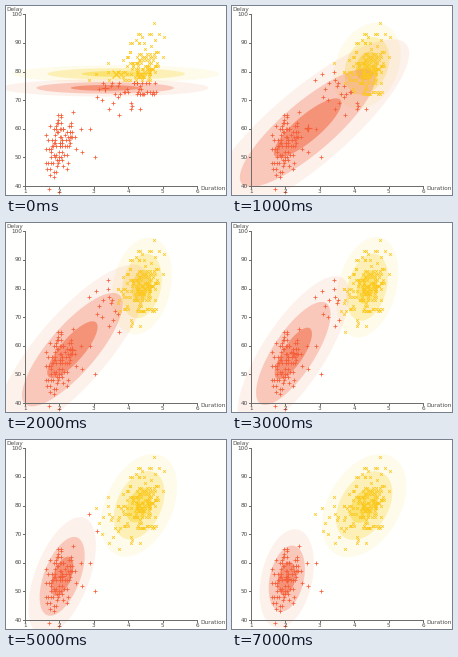
Write a matplotlib script that moves like this. It is 220x189 px and loops after 7.5 s.

```python
import numpy as np
import matplotlib.pyplot as plt
from matplotlib.animation import FuncAnimation
from matplotlib.patches import Polygon

W, H, DPI = 220, 189, 100
STEPS, INTERVAL = 15, 500
PX = 72 / DPI  # points per pixel

AXIS, TEXT = "#6e6e6e", "#4a4a4a"
FILL = ["#f05028", "#f8d21e"]
MARK = ["#f5603c", "#fcc81e"]
SHAPE = ["+", "x"]
SIZE = [3.4, 2.6]
RINGS = {3: 0.08, 2: 0.25, 1: 0.44}  # sigmas: opacity


def px(duration):
    return 19 + (duration - 1) * 34.4


def py(delay):
    return 180 - (delay - 40) * 2.86


def cloud(rng, n, mean, sd, rho, skew):
    """n points with exactly these moments; durations lean towards skew."""
    z = np.column_stack([skew * rng.gamma(5, size=n), rng.normal(size=n)])
    z -= z.mean(axis=0)
    z = np.linalg.solve(np.linalg.cholesky(np.cov(z.T)), z.T)
    cov = np.outer(sd, sd) * [[1, rho], [rho, 1]]
    pts = mean + (np.linalg.cholesky(cov) @ z).T
    pts[:, 1] = np.round(pts[:, 1])  # delays in whole minutes
    return pts


def density(pts, mean, cov):
    d = pts - mean
    dist = np.sum(d * np.linalg.solve(cov, d.T).T, axis=1)
    return np.exp(-dist / 2) / np.sqrt(np.linalg.det(cov))


def expect(pts, weights, means, covs):
    """Share of each cluster in each point."""
    p = np.array([w * density(pts, m, c)
                  for w, m, c in zip(weights, means, covs)]) + 1e-300
    return p / p.sum(axis=0)


def maximise(pts, share):
    weights = share.mean(axis=1)
    means = [np.average(pts, axis=0, weights=s) for s in share]
    covs = [np.cov(pts.T, aweights=s, bias=True) for s in share]
    return weights, means, covs


def ring(mean, cov, k):
    t = np.linspace(0, 2 * np.pi, 120)
    circle = np.array([np.cos(t), np.sin(t)])
    x, y = np.asarray(mean)[:, None] + k * np.linalg.cholesky(cov) @ circle
    return np.column_stack([px(x), py(y)])


# Two clouds, and the run of the EM algorithm that tells them apart
rng = np.random.default_rng(7)
data = np.vstack([
    cloud(rng, 97, (2.04, 54.5), (0.265, 5.8), 0.28, 1),
    cloud(rng, 175, (4.29, 80), (0.41, 6), 0.38, -1),
])
model = ([0.5, 0.5], [(3.33, 74.3), (3.65, 79.2)], [np.eye(2), np.eye(2)])
history = []
for _ in range(STEPS):
    share = expect(data, *model)
    history.append((model, share[1] > share[0]))
    model = maximise(data, share)

fig = plt.figure(figsize=(W / 100, H / 100), dpi=DPI, facecolor="#fffffd")
ax = fig.add_axes([0, 0, 1, 1])
ax.set_xlim(0, W)
ax.set_ylim(H, 0)
ax.axis("off")


def line(x, y):
    ax.plot(x, y, color=AXIS, lw=PX, zorder=5)


def label(x, y, s, ha="center"):
    ax.text(x, y, s, ha=ha, va="center", fontsize=5.8 * PX, color=TEXT,
            family="DejaVu Sans", zorder=6)


line([px(1)] * 2, [py(100), py(40)])
line([px(1), px(6)], [py(40)] * 2)
for v in range(40, 101, 10):
    line([px(1) - 2, px(1)], [py(v)] * 2)
    label(16, py(v), str(v), "right")
for v in range(1, 7):
    line([px(v)] * 2, [py(40), py(40) + 2])
    label(px(v), 185.5, str(v))
label(0, 3.5, "Delay", "left")
label(194.5, 182.5, "Duration", "left")

rings, dots, centres = {}, [], []
for i in range(2):
    for k, alpha in RINGS.items():
        rings[i, k] = ax.add_patch(Polygon(
            [(0, 0), (1, 0), (1, 1)], fc=FILL[i], ec="none",
            alpha=alpha, zorder=2 - i))
    style = dict(ls="none", marker=SHAPE[i], color=MARK[i])
    dots += ax.plot([], [], ms=SIZE[i] * PX, mew=0.8 * PX, zorder=3, **style)
    centres += ax.plot([], [], ms=(SIZE[i] + 5) * PX, mew=1.2 * PX,
                       zorder=4, **style)


def draw(step):
    (_, means, covs), upper = history[step]
    for i, own in enumerate((~upper, upper)):
        for k in RINGS:
            rings[i, k].set_xy(ring(means[i], covs[i], k))
        dots[i].set_data(px(data[own, 0]), py(data[own, 1]))
        centres[i].set_data([px(means[i][0])], [py(means[i][1])])
    return [*rings.values(), *dots, *centres]


anim = FuncAnimation(fig, draw, frames=STEPS, interval=INTERVAL,
                     repeat=True, repeat_delay=0, blit=False)
plt.show()
```
